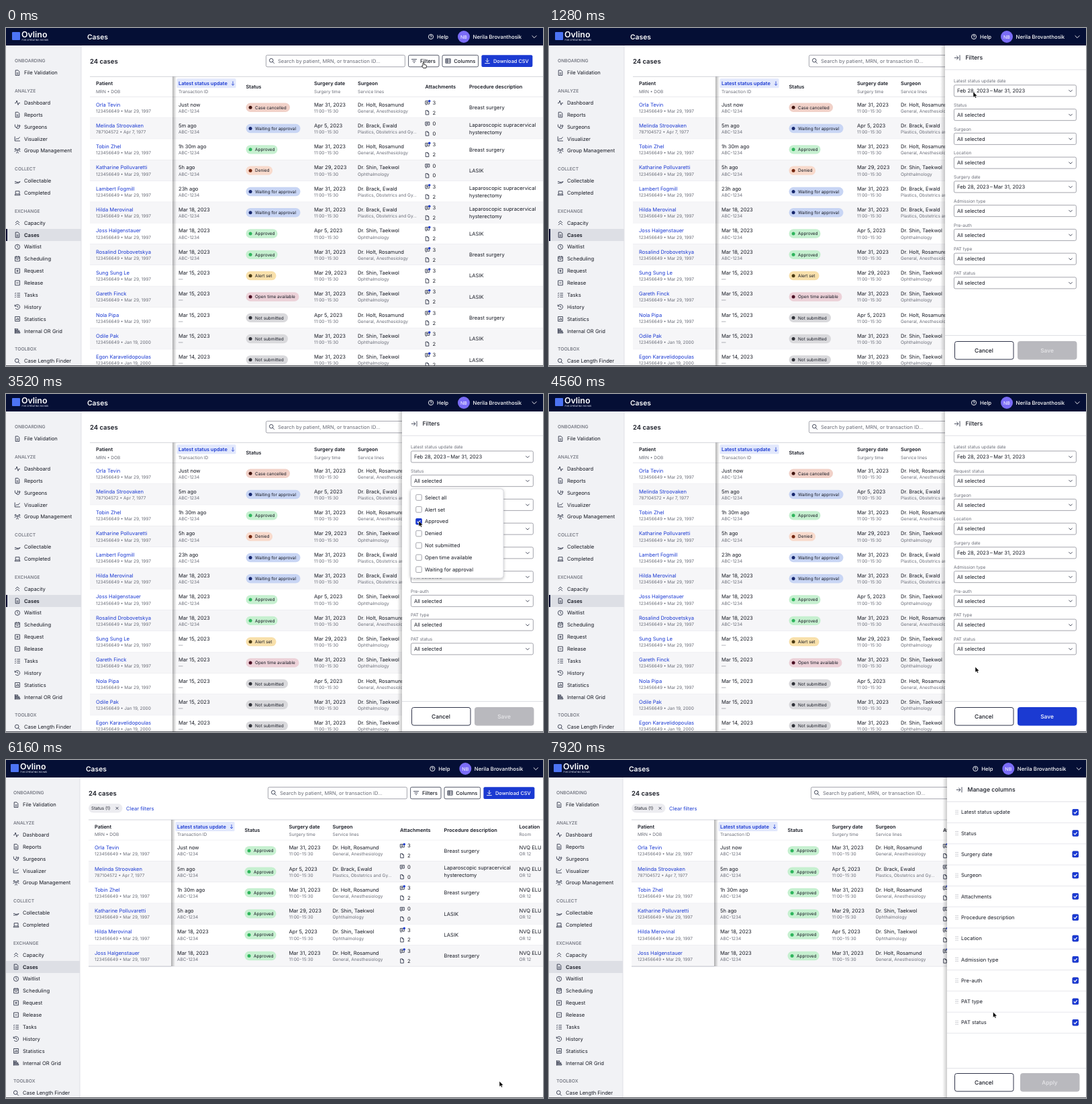
Recreate the animation shown at these times as an HTML page. Size 800x503 px, loop 8 s.

```html
<!DOCTYPE html>
<html lang="en">
<head>
<meta charset="utf-8">
<title>Cases</title>
<style>
html, body { margin: 0; width: 800px; height: 503px; overflow: hidden; background: #fff; }
svg { display: block; font-family: Inter, Roboto, sans-serif; text-rendering: geometricPrecision; }
</style>
</head>
<body>
<svg id="stage" width="800" height="503" viewBox="0 0 800 503"></svg>
<script>
const INK = '#171a24', MUTED = '#6a6d78', BLUE = '#1b3ad2', LINE = '#e1e2e8', BORDER = '#8d8f99';
const LOOP = 8000, PITCH = 31.3;

// Drawing helpers
const text = (x, y, s, size = 7.6, fill = INK, weight = 400, anchor = 'start') =>
  `<text x="${x}" y="${y + size * 0.36}" font-size="${size}" fill="${fill}" font-weight="${weight}" text-anchor="${anchor}">${s}</text>`;
const small = (x, y, s) => text(x, y, s, 6.5, MUTED);
const bold = (x, y, s, fill = INK) => text(x, y, s, 7.4, fill, 600);
const rect = (x, y, w, h, fill, rx = 0, stroke = 'none', sw = 0.8) =>
  `<rect x="${x}" y="${y}" width="${w}" height="${h}" rx="${rx}" fill="${fill}" stroke="${stroke}" stroke-width="${sw}"/>`;
const circle = (x, y, r, fill) => `<circle cx="${x}" cy="${y}" r="${r}" fill="${fill}"/>`;
const group = (id, body, attrs = '') => `<g id="${id}" ${attrs}>${body}</g>`;
const times = (n, fn) => Array.from({ length: n }, (_, i) => fn(i)).join('');

const RING = 'M-3.6 0a3.6 3.6 0 1 0 7.2 0a3.6 3.6 0 1 0-7.2 0';
const BOX = 'M-3.4-3.4H3.4V3.4H-3.4z';
const ICONS = {
  doc: 'M-2.8-3.8H1L2.8-2V3.8H-2.8zM-1.3 0H1.3M-1.3 1.8H1.3',
  page: 'M-2.3-3.1H.7L2.3-1.5V3.1H-2.3zM.7-3.1V-1.5H2.3',
  chat: 'M-3-2.6H3V1.8H-.5L-2 3.2V1.8H-3zM-1.5-1H1.5M-1.5.4H.8',
  pulse: 'M-4 .5H-2.2L-.9-3.2 1 3.2 2.1.5H4',
  scope: 'M-3.6-3.4V-1A2 2 0 0 0 .4-1V-3.4M-1.6 1A2.4 2.4 0 0 0 3 1V-.4M2-1.4a1 1 0 1 0 2 0a1 1 0 1 0-2 0',
  chart: 'M-3.8-3.4V3.2H4M-2.4 1.4L-.5-.8 .8.5 3.6-2.5',
  people: 'M-1.2-.6a1.2 1.2 0 1 0 2.4 0a1.2 1.2 0 1 0-2.4 0M-2 3.6Q0 .6 2 3.6M-3.8-2.4a1 1 0 1 0 2 0a1 1 0 1 0-2 0M1.8-2.4a1 1 0 1 0 2 0a1 1 0 1 0-2 0M-4.4 1.4Q-3.4-.4-2.2.2M4.4 1.4Q3.4-.4 2.2.2',
  hand: 'M-4 3.2H1.6L4.2 1 1.2 1.8H-1L-2.2.8H-4',
  laptop: 'M-2.8-2.8H3V1.4H-2.8zM-4 3.2H4L3 1.4M-4 3.2L-2.8 1.4',
  up: 'M-3 0L0-3 3 0M-3 3.2L0 .2 3 3.2',
  clock: RING + 'M0-2.2V0L1.5 1.2',
  calendar: BOX + 'M-3.4-1.3H3.4M-1.6-4.2V-2.6M1.6-4.2V-2.6M-1.6.8H1.6',
  plus: BOX + 'M-1.7 0H1.7M0-1.7V1.7',
  minus: BOX + 'M-1.7 0H1.7',
  tasks: 'M-4-2.6l.8.7 1.2-1.3M-4 .2l.8.7L-2-.4M-4 3l.8.6L-2 2.4M-.6-2.4H4M-.6.3H4M-.6 3H4',
  history: 'M-3.4-1.2A3.6 3.6 0 1 1-3 2M-3.8-3.4V-1H-1.4M0-2V0L1.5 1',
  bars: BOX + 'M-1.6 1.8V0M0 1.8V-1.8M1.6 1.8V-.8',
  grid: 'M-3.6-3.8V3.8M-3.6-3H.6V-1.4H-3.6M-3.6-.6H2.8V1H-3.6M-3.6 1.8H3.8V3.2H-3.6',
  search: 'M-3.6-.8a2.8 2.8 0 1 0 5.6 0a2.8 2.8 0 1 0-5.6 0M1.2 1.2L3.8 3.8',
  help: RING + 'M-1.1-.8Q-1-2 0-2T1.1-.8Q1 0 0 .3V.8M0 1.7V2.2',
  filter: 'M-4-2.4H4M-2.5 0H2.5M-1 2.4H1',
  columns: 'M-3.6-3.2H3.6V3.2H-3.6zM-3.6-1.2H3.6M-1.2-3.2V3.2M-3.6 1H3.6',
  download: 'M0-4V1.6M-2.4-.8L0 1.6 2.4-.8M-3.8 3.6H3.8',
  down: 'M-2.6-1.2L0 1.4 2.6-1.2',
  menu: 'M-3.4-1.7L0 1.7 3.4-1.7',
  arrow: 'M0-3V3M-2 1L0 3 2 1',
  close: 'M-1.9-1.9L1.9 1.9M1.9-1.9L-1.9 1.9',
  collapse: 'M-4.2 0H2M-.8-2.8L2 0-.8 2.8M4-4V4',
};
const icon = (name, x, y, color = '#1c2238', sw = 0.8) =>
  `<path transform="translate(${x} ${y})" d="${ICONS[name]}" fill="none" stroke="${color}" stroke-width="${sw}" stroke-linejoin="round"/>`;

const checkbox = (x, y, id = '') => rect(x - 4.3, y - 4.3, 8.6, 8.6, '#fff', 1.6, BORDER) +
  `<g ${id && `id="${id}"`}>${rect(x - 4.7, y - 4.7, 9.4, 9.4, BLUE, 1.6)}` +
  `<path d="M${x - 2.4} ${y + 0.1}l1.7 1.8 3.2-3.6" fill="none" stroke="#fff" stroke-width="1.2"/></g>`;

// Sidebar and top bar
const NAV = [
  [49, 'ONBOARDING', ['doc', 'File Validation']],
  [93.5, 'ANALYZE', ['pulse', 'Dashboard'], ['doc', 'Reports'], ['scope', 'Surgeons'], ['chart', 'Visualizer'], ['people', 'Group Management']],
  [210, 'COLLECT', ['hand', 'Collectable'], ['laptop', 'Completed']],
  [272.3, 'EXCHANGE', ['up', 'Capacity'], ['doc', 'Cases'], ['clock', 'Waitlist'], ['calendar', 'Scheduling'], ['plus', 'Request'],
    ['minus', 'Release'], ['tasks', 'Tasks'], ['history', 'History'], ['bars', 'Statistics'], ['grid', 'Internal OR Grid']],
  [478, 'TOOLBOX', ['search', 'Case Length Finder']],
];
const sidebar = () => rect(0, 26, 112, 477, '#f1f2f5') + rect(111.6, 26, 0.8, 477, '#d9dae1') +
  rect(0, 299, 112, 18, '#dddfe5') + rect(0, 299, 2, 18, '#050f35') +
  NAV.map(([y, title, ...items]) => text(13, y, title, 6.75, MUTED, 500) +
    items.map(([name, label], i) => {
      const cy = y + 17.7 + 17.87 * i;
      return icon(name, 17, cy) + text(27, cy, label, 7.6, INK, label === 'Cases' ? 600 : 400);
    }).join('')).join('');
const brand = () => rect(9, 6, 12, 12, '#4d74f4', 1) +
  text(23, 9.6, 'Ovlino', 12.4, '#fff', 600) + text(23.5, 18.2, 'FOR OPERATING ROOMS', 3.3, '#d5d9ea', 500) +
  text(121, 13, 'Cases', 10.3, '#fff', 600);
const account = () => icon('help', 633, 13, '#fff', 0.9) + text(642, 13, 'Help', 7.8, '#fff', 500) +
  circle(682, 13, 9, '#7a6cf6') + text(682, 13, 'NB', 7, '#fff', 400, 'middle') +
  text(695.5, 13, 'Nerila Brovanthosik', 7.8, '#fff', 500) +
  icon('menu', 787, 13, '#fff', 0.9);
const toolbar = () => rect(387.4, 40.4, 207, 17.4, '#fff', 2, BORDER) + icon('search', 396, 49) +
  text(405, 49, 'Search by patient, MRN, or transaction ID…', 7.5, MUTED) +
  rect(599.6, 40.4, 45.4, 17.4, '#fff', 2, '#30354a') + icon('filter', 608, 49) + text(617, 49, 'Filters', 7.8, INK, 500) +
  rect(650, 40.4, 53.6, 17.4, '#fff', 2, '#30354a') + icon('columns', 658.5, 49) + text(667.3, 49, 'Columns', 7.6, INK, 500) +
  rect(708.4, 40.2, 76, 17.8, BLUE, 2) + icon('download', 717, 49, '#fff', 0.9) + text(726, 49, 'Download CSV', 7.4, '#fff', 500);

// Table data
const PATIENTS = ['Orla Tevin', 'Melinda Stroovaken', 'Tobin Zhel', 'Katharine Polluvaretti', 'Lambert Fogmill', 'Hilda Merovinal',
  'Joss Halgenstauer', 'Rosalind Drobovetskya', 'Sung Sung Le', 'Gareth Finck', 'Nola Pipa', 'Odile Pak', 'Egon Karavelidopoulas'];
const UPDATES = ['Just now', '5m ago', '1h 30m ago', '5h ago', '23h ago', ...Array(3).fill('Mar 18, 2023'), ...Array(4).fill('Mar 15, 2023'), 'Mar 14, 2023'];
const STATUS = {
  C: ['Case cancelled', 65.5, '#f1d1c8', '#42150f'], W: ['Waiting for approval', 81, '#c8d5f4', '#17286f'],
  A: ['Approved', 47, '#c6f0d0', '#2fb55c'], D: ['Denied', 39.5, '#f8dacc', '#74260f'],
  L: ['Alert set', 45, '#f8e0ab', '#4b3a12'], O: ['Open time available', 79, '#ecd1d8', '#4c1024'],
  N: ['Not submitted', 62.5, '#d9d9dc', '#303239'],
};
const SURGEONS = {
  G: ['Dr. Holt, Rosamund', 'General, Anesthesiology'],
  S: ['Dr. Brack, Ewald', 'Plastics, Obstetrics and Gy...'],
  P: ['Dr. Shin, Taekwol', 'Ophthalmology'],
};
const PROCEDURES = { B: ['Breast surgery'], H: ['Laparoscopic supracervical', 'hysterectomy'], L: ['LASIK'] };
const DATES = [31, 5, 31, 29, 31, 31, 5, 31, 29, 31, 5, 31, 31].map(d => `${d === 5 ? 'Apr' : 'Mar'} ${d}, 2023`);
const birth = i => i === 1 ? '787104572 • Apr 7, 1977' : `123456649 • ${i > 10 ? 'Jan 19, 2000' : 'Mar 29, 1997'}`;

function pill(code, x, y) {
  const [label, width, fill, dot] = STATUS[code];
  return rect(x, y - 6.7, width, 13.4, fill, 6.7) + circle(x + 6.6, y, 2.5, dot) + text(x + 13.5, y, label, 6.45);
}
function attachments(x, y, empty) {
  return icon('chat', x + 3.3, y - 7) + (empty ? '' : circle(x + 6.3, y - 9.6, 1.7, BLUE)) + text(x + 11, y - 7.2, empty ? 0 : 3) +
    icon('page', x + 3, y + 7.6) + text(x + 11, y + 7.6, empty ? 0 : 2);
}
// Rows pair a patient index with a case index; right-hand columns start at x offset `shift`.
function table(x, y, shift, rows, statusOf, height) {
  const col = n => n + shift;
  const head = rect(x, y - 0.4, 800, 0.8, '#c9cad2') + rect(x, y + 29.9, 800, 0.8, '#d3d4db') +
    bold(x + 9, y + 10, 'Patient') + small(x + 9, y + 22, 'MRN • DOB') +
    rect(x + 129.5, y + 3, 88, 14, '#e2e8fc', 1.5) + bold(x + 132, y + 10, 'Latest status update', BLUE) + icon('arrow', x + 213, y + 10, BLUE) +
    small(x + 132, y + 22, 'Transaction ID') + bold(x + 232.5, y + 15, 'Status') +
    bold(col(459), y + 10, 'Surgery date') + small(col(459), y + 22, 'Surgery time') +
    bold(col(524), y + 10, 'Surgeon') + small(col(524), y + 22, 'Service lines') +
    bold(col(624.5), y + 15, 'Attachments') + bold(col(690), y + 15, 'Procedure description') +
    bold(col(802), y + 10, 'Location') + small(col(802), y + 22, 'Room');
  const body = rows.map(([p, c], i) => {
    const top = y + 30.3 + PITCH * i, mid = top + PITCH / 2, hi = mid - 4.4, lo = mid + 5.2;
    const [doctor, service] = SURGEONS['GSGPSSPGPPGPP'[c]];
    const lines = PROCEDURES['BHBLHHLBLLBLL'[c]];
    return rect(x, top, 800, PITCH, i % 2 ? '#f6f6f8' : '#fff') + rect(x, top + PITCH - 0.4, 800, 0.8, LINE) +
      text(x + 9, hi, PATIENTS[p], 7.6, BLUE) + small(x + 9, lo, birth(p)) +
      text(x + 132, hi, UPDATES[c]) + small(x + 132, lo, c < 8 ? 'ABC-1234' : '—') +
      pill(statusOf(c), x + 232.5, mid) +
      text(col(459), hi, DATES[c]) + small(col(459), lo, '11:00\u200a-\u200a15:30') +
      text(col(524), hi, doctor) + small(col(524), lo, service) +
      attachments(col(624.5), mid, c === 1 || c === 3) +
      lines.map((s, k) => text(col(690), mid + (k - (lines.length - 1) / 2) * 11, s)).join('') +
      text(col(802), hi, 'NVQ ELU Surgery') + small(col(802), lo, 'OR 12');
  }).join('');
  return head + body + rect(x + 123, y, 6, height, 'url(#edge)');
}
const skeleton = () => times(18, r => [123, 327, 457.5, 588, 718.3].map((x, c) =>
  rect(x, 85.4 + 22.35 * r, c ? 66 : 140, 13.4, '#f1f1f3', 6.7)).join(''));

// Side panels
const button = (x, label, fill, color, stroke = fill) =>
  rect(x + 0.5, 466.5, 87.5, 26.6, fill, 3, stroke, 1) + text(x + 44, 480, label, 8.4, color, 500, 'middle');
const panel = (x, title, footY) => rect(x - 7, 26, 7, 477, 'url(#cast)') + rect(x, 26, 215, 477, '#fff') +
  rect(x, 61.6, 215, 0.8, '#d6d7de') + rect(x, footY, 215, 0.8, '#d6d7de') +
  icon('collapse', x + 18, 44.3) + text(x + 30.5, 44.3, title, 8.7, INK, 500) +
  button(604, 'Cancel', '#fff', INK, '#30354a');
const FIELDS = ['Latest status update date', 'Status', 'Surgeon', 'Location', 'Surgery date', 'Admission type', 'Pre-auth', 'PAT type', 'PAT status'];
const filterPanel = () => panel(590, 'Filters', 457) + FIELDS.map((label, i) => {
  const y = 93.4 + 35.75 * i;
  const caption = i === 1 ? group('labelBefore', small(603, y - 14.6, label)) + group('labelAfter', small(603, y - 14.6, 'Request status')) : small(603, y - 14.6, label);
  return caption + rect(603.4, y - 8.5, 182, 17, '#fff', 2, BORDER) +
    text(608, y, i % 4 || i === 8 ? 'All selected' : 'Feb 28, 2023\u2009–\u2009Mar 31, 2023') + icon('down', 777, y);
}).join('') +
  group('saveOff', button(698, 'Save', '#b9b9be', '#e6e6e9')) + group('saveOn', button(698, 'Save', BLUE, '#fff'));
const OPTIONS = ['Select all', 'Alert set', 'Approved', 'Denied', 'Not submiitted', 'Open time available', 'Waiting for approval'];
const dropdown = () => rect(602.5, 141, 138.5, 133, '#fff', 4, '#c9cad2', 0.7).replace('/>', ' filter="url(#lift)"/>') +
  OPTIONS.map((s, i) => checkbox(615, 154 + 17.87 * i, 'option' + i) + text(624, 154 + 17.87 * i, s)).join('');
const COLUMNS = ['Latest status update', 'Status', 'Surgery date', 'Surgeon', 'Attachments', 'Procedure description', 'Location', 'Admission type', 'Pre-auth', 'PAT type', 'PAT status'];
const columnPanel = () => panel(593, 'Manage columns', 458.5) + COLUMNS.map((s, i) => {
  const y = 77.7 + PITCH * i;
  return times(6, k => circle(606.3 + 2.6 * (k % 2), y - 2.6 + 2.6 * (k >> 1), 0.6, '#9a9ca6')) +
    text(614, y, s) + checkbox(784.3, y) + rect(593, y + 15.4, 215, 0.8, LINE);
}).join('') + button(702, 'Apply', '#b9b9be', '#e6e6e9');

const allRows = PATIENTS.map((_, i) => [i, i]);
const approvedRows = [[0, 0], [1, 1], [2, 2], [3, 3], [5, 6], [6, 7]];
const gradient = (id, from, to) => `<linearGradient id="${id}"><stop stop-color="#000" stop-opacity="${from}"/><stop offset="1" stop-color="#000" stop-opacity="${to}"/></linearGradient>`;

document.getElementById('stage').innerHTML =
  `<defs>${gradient('edge', 0.3, 0)}${gradient('cast', 0, 0.2)}<filter id="lift"><feDropShadow dx="0" dy="1.5" stdDeviation="2" flood-opacity=".28"/></filter></defs>` +
  rect(0, 0, 800, 503, '#fff') +
  group('allCases', table(125, 72.3, 0, allRows, c => 'CWADWWAALONNN'[c], 431)) +
  group('loading', skeleton()) +
  group('approvedCases', table(123, 89, -37.5, approvedRows, () => 'A', 218) + rect(123, 306.6, 123, 1, '#c9cad2') +
    rect(123, 65, 50.5, 13.6, '#ececf0', 6.8) + text(127, 71.8, 'Status (1)', 6.45) + icon('close', 165.5, 71.8) + text(179, 71.8, 'Clear filters', 7.6, BLUE)) +
  group('toolbar', toolbar()) +
  group('left', sidebar() + text(125, 49.3, '24 cases', 9.5, INK, 600)) +
  rect(0, 0, 800, 26, '#050f35') + group('brand', brand()) + group('account', account()) +
  group('filters', filterPanel() + group('dropdown', dropdown())) +
  group('columns', columnPanel()) +
  rect(0, 502.2, 800, 0.8, '#33353d') +
  group('cursor',
    group('pointer', '<path d="M0 0V8.2L1.9 6.5 3.2 9.2 4.6 8.6 3.4 6H5.9z"/>', 'fill="#000" stroke="#fff" stroke-width=".5"') +
    group('hand', '<path d="M-1 .6Q0-.6 .8.6V3.4L4 4.2Q4.8 4.5 4.6 5.6L3.8 8.6H-.4L-2.6 5.4Q-2.4 4.4-1 5.2z"/>', 'fill="#fff" stroke="#000" stroke-width=".8"'));

// Timeline
const el = Object.fromEntries([...document.querySelectorAll('[id]')].map(e => [e.id, e]));
const show = (id, on) => { el[id].style.display = on ? '' : 'none'; };
const move = (id, x, y = 0) => el[id].setAttribute('transform', `translate(${x} ${y})`);
const progress = (t, start, length) => Math.min(1, Math.max(0, (t - start) / length));
const easeOut = p => 1 - (1 - p) ** 3;
const easeInOut = p => p * p * (3 - 2 * p);

const FILTERS_OPEN = 320, DROPDOWN_OPEN = 1680, CLEAR_ALL = 2880, PICK = 3440, DROPDOWN_CLOSE = 4320;
const SAVE = 5120, LOADED = 6160, COLUMNS_OPEN = 7040;
const PATH = [[0, 622, 51], [560, 622, 51], [1120, 632, 95], [1360, 632, 95], [1600, 640, 129], [1840, 640, 129],
  [2320, 620, 183], [2480, 620, 183], [2720, 614, 154], [2960, 614, 154], [3280, 615, 189], [3520, 615, 189],
  [4160, 635, 406], [4640, 635, 406], [4960, 735, 478], [6240, 735, 478], [6800, 677, 49], [7200, 677, 49], [7920, 661.5, 375], [8000, 661.5, 375]];

function cursorAt(t) {
  const i = PATH.findIndex(k => k[0] > t);
  const [t0, x0, y0] = PATH[i - 1], [t1, x1, y1] = PATH[i];
  const p = easeInOut((t - t0) / (t1 - t0));
  return [x0 + (x1 - x0) * p, y0 + (y1 - y0) * p];
}

function render(t) {
  const saved = t >= SAVE, loaded = t >= LOADED, chosen = t >= DROPDOWN_CLOSE;
  show('allCases', !saved);
  show('loading', saved && !loaded);
  show('approvedCases', loaded);
  move('left', saved ? -2 : 0);
  move('brand', saved ? -2 : 0);
  move('account', saved ? 2.3 : 0);
  move('toolbar', loaded ? 3 : saved ? -2.3 : 0);

  show('filters', t >= FILTERS_OPEN && !saved);
  move('filters', 220 * (1 - easeOut(progress(t, FILTERS_OPEN, 320))));
  show('dropdown', t >= DROPDOWN_OPEN && !chosen);
  OPTIONS.forEach((_, i) => show('option' + i, t < CLEAR_ALL || (i === 2 && t >= PICK)));
  show('labelBefore', !chosen);
  show('labelAfter', chosen);
  show('saveOff', !chosen);
  show('saveOn', chosen);

  show('columns', t >= COLUMNS_OPEN);
  move('columns', 220 * (1 - easeOut(progress(t, COLUMNS_OPEN, 320))));

  const onButton = t < 480 || (t >= 4900 && t < SAVE) || (t >= 6740 && t < COLUMNS_OPEN + 80);
  show('hand', onButton);
  show('pointer', !onButton);
  move('cursor', ...cursorAt(t));
}

const start = performance.now();
function tick() {
  render((performance.now() - start) % LOOP);
  requestAnimationFrame(tick);
}
tick();
</script>
</body>
</html>
```
